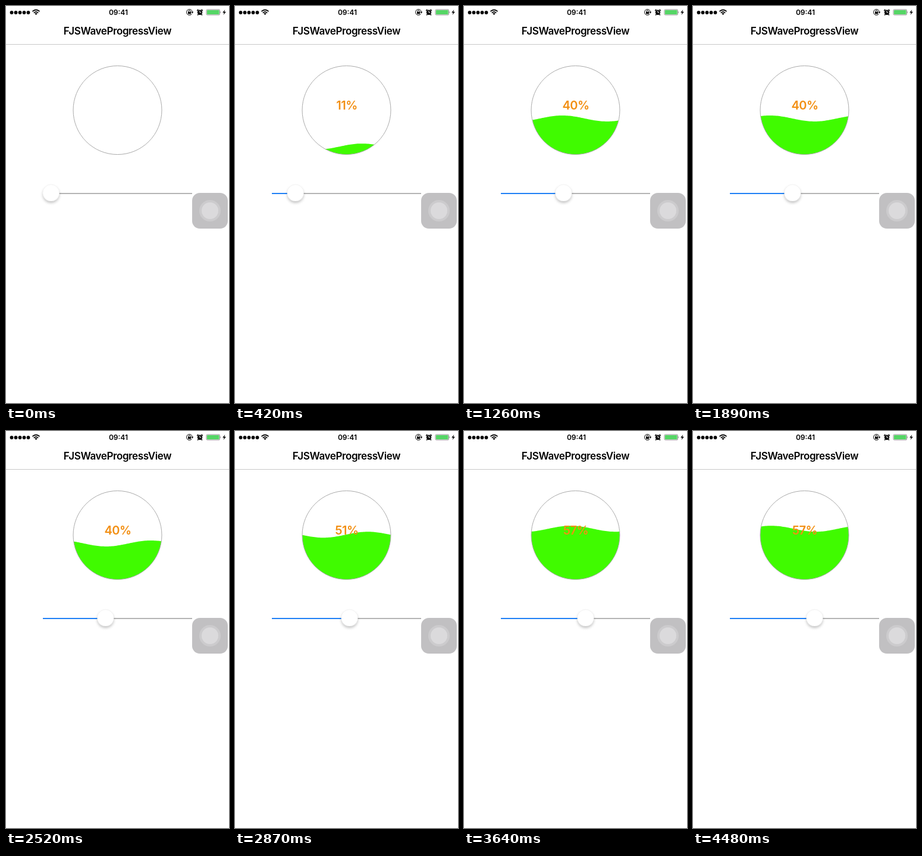
Recreate the animation shown at these times as an HTML page. Size 375 px wide and 667 px high, loop 4620 ms.

```html
<!DOCTYPE html>
<html lang="en">
<head>
<meta charset="utf-8">
<title>Wave progress</title>
<style>
html, body { margin: 0; width: 100%; height: 100%; overflow: hidden; background: #fff; }
svg { display: block; width: 375px; height: 667px; }
text { font-family: Inter, Roboto, sans-serif; font-weight: 600; text-anchor: middle; }
.line { fill: none; stroke: #000; }
</style>
</head>
<body>
<svg viewBox="0 0 375 667">
  <defs>
    <clipPath id="disc"><circle cx="187.5" cy="175" r="74.5"/></clipPath>
    <filter id="shadow" x="-50%" y="-50%" width="200%" height="200%">
      <feDropShadow dx="0" dy="3" stdDeviation="2" flood-opacity=".22"/>
    </filter>
  </defs>

  <!-- Status bar -->
  <g id="signal"></g>
  <g class="line" stroke-width="1.8">
    <path d="M44.5 9.2Q50.5 3.8 56.5 9.2M46.8 11.6Q50.5 8.2 54.2 11.6"/>
    <path d="M50.5 15L48.3 12.7Q50.5 11 52.7 12.7Z" fill="#000" stroke="none"/>
  </g>
  <text x="189" y="15" font-size="12">09:41</text>
  <g class="line">
    <path d="M312.5 13.2A4.9 4.9 0 1 1 313.3 9.8"/>
    <path d="M311.2 9.8H315.4L313.3 12.4Z" fill="#000" stroke="none"/>
    <path d="M306.9 10V8.8A1.6 1.6 0 0 1 310.1 8.8V10"/>
    <rect x="306" y="9.8" width="5" height="3.6" fill="#000" stroke="none"/>
  </g>
  <circle cx="326" cy="10.8" r="4.2"/>
  <path class="line" stroke-width="1.6" d="M321.2 8L323.4 5.9M330.8 8L328.6 5.9M323.3 14L322.2 15.4M328.7 14L329.8 15.4"/>
  <path class="line" style="stroke:#fff" d="M326 8V11H328.5"/>
  <rect x="337" y="6" width="22.5" height="9" rx="1.5" fill="none" stroke="#8c8c8c"/>
  <rect x="338" y="7" width="20.5" height="7" rx=".6" fill="#55d665"/>
  <path d="M360.5 9Q362 10.5 360.5 12Z" fill="#555"/>
  <path d="M368.3 6L364.2 11.2H366.8L365.6 15L370 9.7H367.2Z"/>

  <text x="187.5" y="48" font-size="17" letter-spacing="-.4">FJSWaveProgressView</text>
  <path d="M0 64.5H375" stroke="#c8c8c8"/>

  <path id="wave" fill="#40fb00" clip-path="url(#disc)"/>
  <circle cx="187.5" cy="175" r="74.5" fill="none" stroke="#aaa"/>
  <text id="label" x="188" y="174" font-size="20" letter-spacing="-.5" fill="#f28f13"></text>

  <path d="M62 315H313" stroke="#b5b5b5" stroke-width="2"/>
  <path id="filled" stroke="#2080f5" stroke-width="2"/>
  <circle id="thumb" cy="314" r="14" fill="#fff" stroke="#000" stroke-opacity=".1" stroke-width=".5" filter="url(#shadow)"/>

  <rect x="313" y="314" width="60" height="60" rx="13" fill="#c1c0c2"/>
  <circle cx="343" cy="344" r="18" fill="#cccbcd"/>
  <circle cx="343" cy="344" r="14" fill="#dbdadc"/>
</svg>
<script>
const LOOP = 4620, HOLD = 280, STEP = 70, LAST = 61;
const WAVELENGTH = 150, AMPLITUDE = 5, SPEED = 4;
// Slider drag as [step, value]
const drag = [[0, 0], [1, .025], [4, .16], [7, .303], [8, .342], [9, .37], [10, .39], [12, .407],
  [33, .407], [35, .435], [39, .547], [41, .572], [LAST, .572]];
const $ = id => document.getElementById(id);

$('signal').innerHTML = [0, 1, 2, 3, 4]
  .map(i => `<circle cx="${9.5 + i * 7}" cy="11" r="2.9"/>`).join('');

function valueAt(step) {
  const i = Math.max(1, drag.findIndex(([s]) => s >= step));
  const [s0, v0] = drag[i - 1], [s1, v1] = drag[i];
  return v0 + (v1 - v0) * Math.max(0, step - s0) / (s1 - s0);
}

function wavePath(step) {
  const level = 250 - 150 * valueAt(step - .5);
  const crest = 131.5 + (LAST - step) * SPEED;
  let d = 'M112 252';
  for (let x = 112; x <= 264; x += 2) {
    const y = level - AMPLITUDE * Math.cos((x - crest) * 2 * Math.PI / WAVELENGTH);
    d += `L${x} ${y.toFixed(2)}`;
  }
  return d + 'V252Z';
}

function draw(now) {
  const t = now % LOOP;
  const step = t < HOLD ? 0 : Math.min(LAST, Math.floor((t - HOLD) / STEP) + 1);
  const value = valueAt(step);
  const x = 75.8 + 225 * value;
  $('wave').setAttribute('d', step ? wavePath(step) : '');
  $('label').textContent = step ? Math.floor(value * 100) + '%' : '';
  $('filled').setAttribute('d', `M62 315H${x}`);
  $('thumb').setAttribute('cx', x);
}

const start = performance.now();
function tick() {
  draw(performance.now() - start);
  requestAnimationFrame(tick);
}
tick();
</script>
</body>
</html>
```
